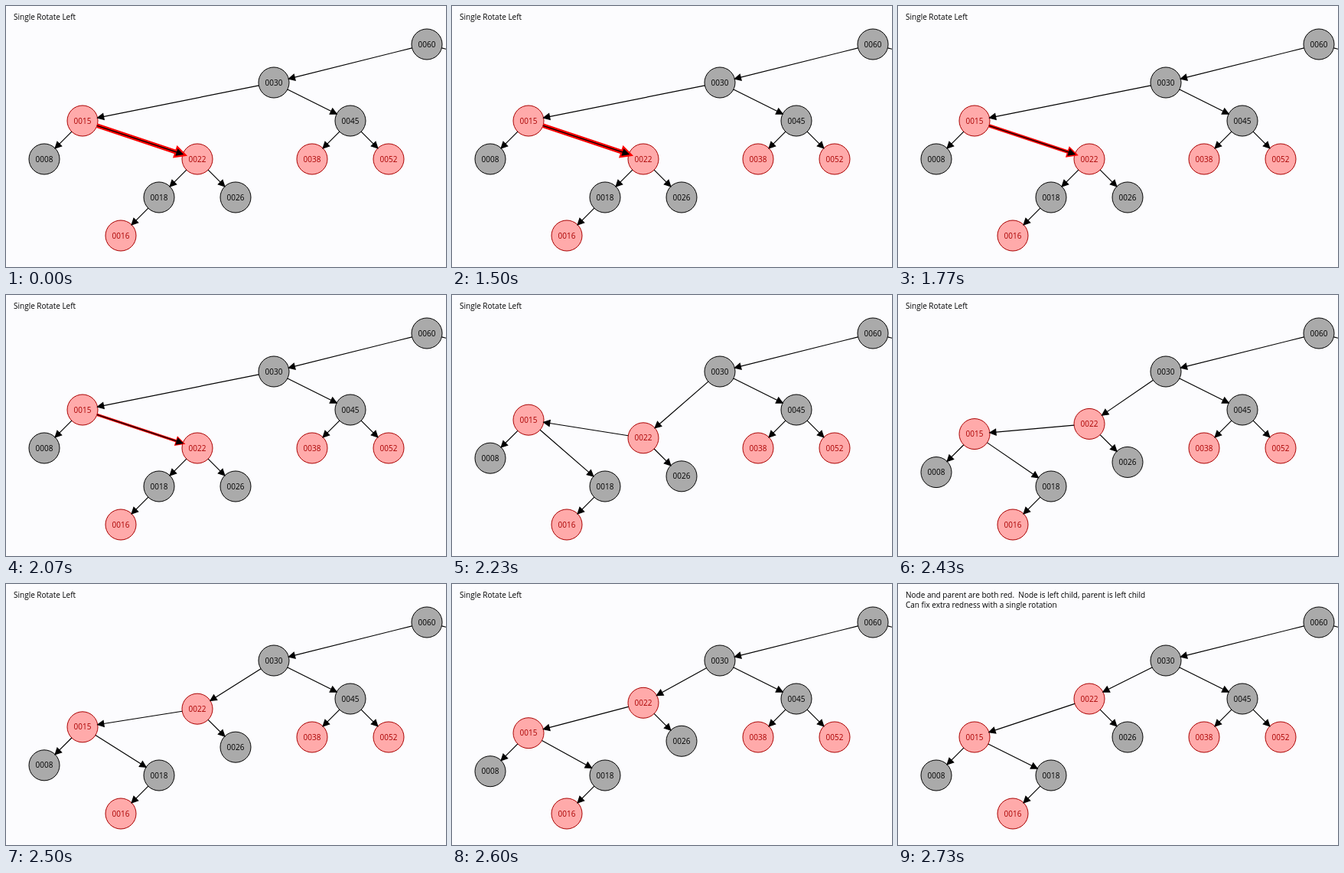
An HTML page that plays this animation: 575x341 px, repeating every 5.73 s.

```html
<!DOCTYPE html>
<html lang="en">
<head>
<meta charset="utf-8">
<title>Tree rotation</title>
<style>
  html, body { margin: 0; width: 100%; height: 100%; overflow: hidden; background: #fcfcfe; }
  svg { display: block; width: 575px; height: 341px; }
  text { font: 10px "Open Sans", "Noto Sans", sans-serif; white-space: pre; }
  .node { fill: #aaa; stroke: #000; }
  .node text { text-anchor: middle; fill: #000; stroke: none; }
  .red { fill: #faa; stroke: #a00; }
  .red text { fill: #a00; }
  .edge { fill: #000; stroke: #000; stroke-width: 1.2; }
  .glow { fill: #f00; stroke: #f00; }
</style>
</head>
<body>
<svg viewBox="0 0 575 341">
  <g id="nodes"></g>
  <g id="edges"></g>
  <text id="line1" x="10" y="18"></text>
  <text id="line2" x="10" y="30.5"></text>
</svg>
<script>
const LOOP = 5730, PULSE = 1500, MOVE = 2100, DONE = 2730;
const GRID = 50, RADIUS = 20, HEAD_LEN = 8, HEAD_HALF = 4, STEPS = 19;

// Keys in insertion order; the rotation swaps 15 and 22
const left = [8, 18, 16, 26], right = [45, 38, 52, 90, 75, 70, 80];
const before = grow([60, 30, 15, 22, ...left, ...right]);
const after = grow([60, 30, 22, 15, ...left, ...right]);
const red = new Set([15, 22, 16, 38, 52]);

// Binary search tree: x follows the sorted rank, y the depth
function grow(keys) {
  const sorted = [...keys].sort((a, b) => a - b), kids = {}, tree = {};
  for (const key of keys) {
    let parent = null, next = keys[0], y = GRID;
    while (next !== key && next !== undefined) {
      parent = next;
      const side = key < parent ? 0 : 1;
      next = kids[parent][side] ??= key;
      y += GRID;
    }
    kids[key] = [];
    tree[key] = { parent, x: GRID * (sorted.indexOf(key) + 1), y };
  }
  return tree;
}

const $ = id => document.getElementById(id);

function add(parent, tag, attrs) {
  const el = document.createElementNS("http://www.w3.org/2000/svg", tag);
  for (const k in attrs) el.setAttribute(k, attrs[k]);
  return parent.appendChild(el);
}

const glow = add($("edges"), "path", { class: "glow" });
const groups = {}, edges = {};
for (const key in before) {
  const g = groups[key] = add($("nodes"), "g", { class: red.has(+key) ? "node red" : "node" });
  add(g, "circle", { r: RADIUS });
  add(g, "text", { y: 3.5 }).textContent = key.padStart(4, "0");
  edges[key] = add($("edges"), "path", { class: "edge" });
}

function place(key, p) {
  const a = before[key], b = after[key];
  return [a.x, a.y + (b.y - a.y) * p];
}

function arrow(from, to, p) {
  const [x1, y1] = place(from, p), [x2, y2] = place(to, p);
  const len = Math.hypot(x2 - x1, y2 - y1);
  const ux = (x2 - x1) / len, uy = (y2 - y1) / len;
  const tip = [x2 - ux * RADIUS, y2 - uy * RADIUS];
  const bx = tip[0] - ux * HEAD_LEN, by = tip[1] - uy * HEAD_LEN;
  const sx = uy * HEAD_HALF, sy = -ux * HEAD_HALF;
  return `M${x1 + ux * RADIUS},${y1 + uy * RADIUS}L${tip}` +
         `M${tip}L${bx + sx},${by + sy}L${bx - sx},${by - sy}Z`;
}

// Ticks at 30 per second, rounded to 10 ms
const ticks = ms => Math.floor((ms + 3.4) * 3 / 100);

function draw(t) {
  const moved = t >= MOVE, done = t >= DONE;
  const p = moved ? Math.min(1, Math.floor(1 + 1.1 * ticks(t - MOVE)) / STEPS) : 0;
  const tree = moved ? after : before;

  for (const key in tree) {
    groups[key].setAttribute("transform", `translate(${place(key, p)})`);
    const { parent } = tree[key];
    if (parent) edges[key].setAttribute("d", arrow(parent, key, p));
  }

  glow.setAttribute("d", moved ? "" : arrow(15, 22, 0));
  glow.setAttribute("stroke-width", 5.7 - ticks(Math.max(0, t - PULSE)) / 7);

  $("line1").textContent = done
    ? "Node and parent are both red.  Node is left child, parent is left child"
    : "Single Rotate Left";
  $("line2").textContent = done ? "Can fix extra redness with a single rotation" : "";
}

const start = performance.now();
function frame() {
  draw((performance.now() - start) % LOOP);
  requestAnimationFrame(frame);
}
frame();
</script>
</body>
</html>
```
